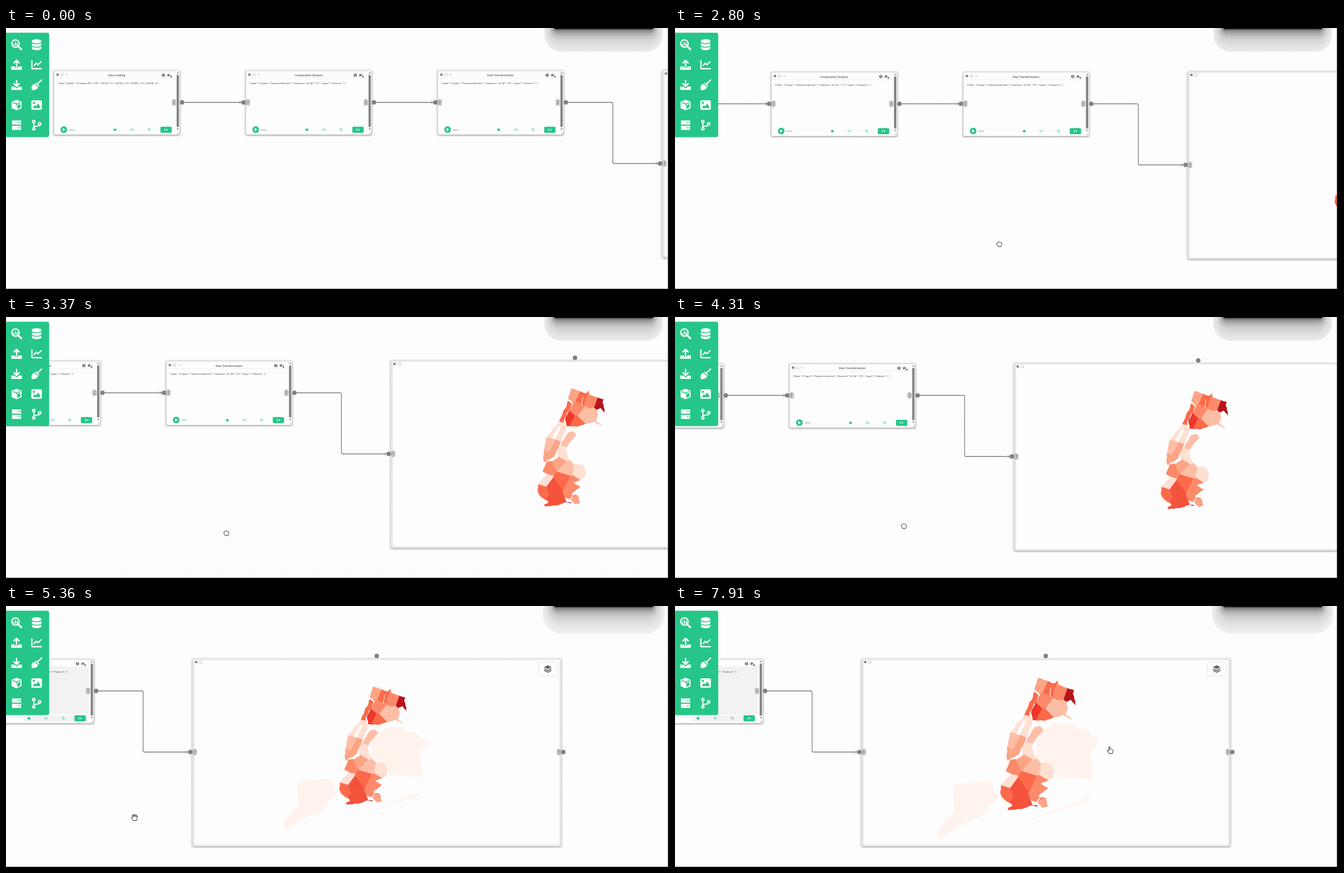
An HTML page for the animation above (8 s loop, 1192x470 px).

```html
<!DOCTYPE html>
<html lang="en">
<head>
<meta charset="utf-8">
<title>Dataflow canvas</title>
<style>
html, body { margin: 0; width: 100%; height: 100%; overflow: hidden; background: #fdfdfd; }
svg { display: block; width: 100vw; height: 100vh; }
text { font-family: "Open Sans", "Noto Sans", sans-serif; }
.title { font-size: 4.8px; font-weight: 600; fill: #555; text-anchor: middle; }
.body { font-size: 4.18px; fill: #222; }
.done { font-size: 4px; fill: #3f7d3f; }
.line { fill: none; stroke: #7c7c7c; stroke-width: 1.3; }
.thin { fill: none; stroke: #808080; stroke-width: .7; }
.green { fill: none; stroke: #26c688; stroke-width: .8; }
.card { filter: drop-shadow(0 1px 1.4px #8c8c8c); }
.button { filter: drop-shadow(0 .5px 1.2px #bbb); }
.icon { fill: none; stroke: #fff; stroke-width: 2.6; stroke-linecap: round; stroke-linejoin: round; }
.icon .f { fill: #fff; stroke: none; }
.icon .g { fill: #26c688; stroke: none; }
.cursor { fill: #fff; stroke: #222; stroke-linejoin: round; }
</style>
</head>
<body>
<svg id="stage" viewBox="0 0 1192 470" preserveAspectRatio="none"></svg>
<script>
const LOOP = 8000;
const TICK = 134;
const GREEN = '#26c688';
const GREY = '#808080';
const WHITE = '#fdfdfd';
const GAP = 11.5;
const STEP = 345; // distance between cards
const HOME = 844.5; // pan at which the map is drawn

const rect = (x, y, w, h, r, fill, more = '') =>
  `<rect x="${x}" y="${y}" width="${w}" height="${h}" rx="${r}" fill="${fill}" ${more}/>`;
const circle = (x, y, r, fill = GREY) => `<circle cx="${x}" cy="${y}" r="${r}" fill="${fill}"/>`;
const path = (d, more = '') => `<path d="${d}" ${more}/>`;
const line = (d, cls) => path(d, `class="${cls}"`);
const at = (x, y, inner, more = '') => `<g transform="translate(${x} ${y})" ${more}>${inner}</g>`;
const label = (x, y, cls, s) => `<text x="${x}" y="${y}" class="${cls}">${s}</text>`;
const lerp = (a, b, k) => a + (b - a) * k;
const clamp = (v, a, b) => Math.min(b, Math.max(a, v));
const points = s => s.split(' ').map(p => p.split(',').map(Number));

let seed = 11;
const random = () => (seed = seed * 16807 % 2147483647) / 2147483647;

// Nodes and links
const port = (x, y) => at(x, y,
  rect(-2.8, -4.6, 5.6, 9.2, 1, '#fff', 'stroke="#555" stroke-width=".8"') +
  path('M0-3.4L1.5-1.3H-1.5ZM0 3.4L1.5 1.3H-1.5ZM-.5-1.5h1v3h-1z', 'fill="#444"'));

const expand = (x, y) => at(x, y, line('M-2-.8V-2H-.8M.8-2H2V-.8M2 .8V2H.8M-.8 2H-2V.8', 'thin'));

function card(i, title, body, shade = '') {
  return at(86 + STEP * i, 0,
    rect(-.5, 76, 227.5, 116.5, 3, '#dedede', 'class="card"') +
    rect(1, 77.8, 224.5, 113.6, 2, WHITE) +
    line('M2 90.5H219', 'thin" stroke-opacity=".15') + shade +
    circle(6.7, 84, 2.3) + expand(14.8, 84) + line('M21.8 84.2h3.4', 'thin') +
    label(113, 87, 'title', title) +
    circle(197, 85, 3) + path('M197 84.5v2M197 83v.7', 'stroke="#fff" stroke-width=".8"') +
    path('M204 84.8q0-2.3 2.6-2.3t2.6 2.1-2.6 2.1l-2.4.8zM208 87.6q2.2-.2 2.2-2.5 2 .4 2 2.1l.3 1.6q-3.2.6-4.5-1.2z', `fill="${GREY}"`) +
    label(7, 101.2, 'body', body) +
    rect(220.8, 84.5, 4, 94, 1.6, GREY) +
    path('M222.8 79.4l2 2.8h-4zM222.8 183.8l2-2.8h-4z', `fill="${GREY}"`) +
    line('M222 190.6l3-3M224 190.8l1.2-1.2', 'thin') +
    circle(18, 183, 6, GREEN) + path('M16 180l5 3-5 3z', 'fill="#fff"') +
    label(28, 184.6, 'done', 'Done') +
    path('M107.5 183.5q0-2.6 2.4-2.6t2.4 2.6v1.8h-4.8z', `fill="${GREEN}"`) +
    line('M139.4 181.4l-1.7 1.7 1.7 1.7M142 181.4l1.7 1.7-1.7 1.7M141.2 181l-1 4.2', 'green') +
    line('M169.6 181.2v1.8h1.8M169.8 182.6a2 2 0 1 1 .2 1.9', 'green') +
    rect(191.6, 177.7, 20.4, 11, 2, GREEN) +
    path('M199.6 181v4.4M201.2 183.2h3.2M203 181.8l1.5 1.4-1.5 1.4', 'fill="none" stroke="#fff" stroke-width=".9"') +
    port(216, 134));
}

const link = (x1, y1, x2, y2, d) =>
  line(`M${x1} ${y1}${d}H${x2}`, 'line') +
  line(`M${x2 - 8} ${y2 - 3}l4 3-4 3`, 'thin') +
  circle(x1, y1, 4) + circle(x2, y2, 4) + port(x2 + 8, y2);

const feature = id =>
  `{"data": "{\\"type\\": \\"FeatureCollection\\", \\"features\\": [{\\"id\\": \\"${id}\\", \\"type\\": \\"Feature\\", \\"...`;
const records = '{"data": [{"data": "{\\"Unique ID\\": {\\"0\\": 179772, \\"1\\": 221956, \\"2\\": 221806, \\"3\\": 221836, \\"4...';

// Map: rough coastlines filled with the cells around district centres
function coast(corners) {
  const pts = points(corners);
  return pts.flatMap(([x, y], i) => {
    const [u, v] = pts[(i + 1) % pts.length];
    const n = Math.ceil(Math.hypot(u - x, v - y) / 5);
    return Array.from({ length: n }, (_, j) => {
      const r = j ? 1.6 : 0;
      return [lerp(x, u, j / n) + r * (random() - .5), lerp(y, v, j / n) + r * (random() - .5)];
    });
  }).map(p => p.map(c => c.toFixed(1))).join(' ');
}

// Part of a polygon that lies nearer to a than to b.
function nearer(poly, a, b) {
  const side = p => Math.hypot(p[0] - b[0], p[1] - b[1]) ** 2 - Math.hypot(p[0] - a[0], p[1] - a[1]) ** 2;
  return poly.flatMap((p, i) => {
    const q = poly[(i + 1) % poly.length];
    const s = side(p), e = side(q);
    const cut = s * e < 0 ? [[lerp(p[0], q[0], s / (s - e)), lerp(p[1], q[1], s / (s - e))]] : [];
    return s >= 0 ? [p, ...cut] : cut;
  });
}

const reds = ['#fee0d2', '#fdbea6', '#fca486', '#fc8a6a', '#fb6a4a', '#f4523b', '#ed382b', '#b81419'];
const frame = points('480,120 780,120 780,420 480,420');

// Each centre is x,y,shade.
function region(id, shape, centres) {
  const sites = points(centres);
  const cells = sites.map(a => {
    const cell = sites.filter(b => b !== a).reduce((poly, b) => nearer(poly, a, b), frame);
    return `<polygon points="${cell.join(' ')}" fill="${reds[a[2]]}" stroke="${reds[a[2]]}" stroke-width=".5"/>`;
  });
  return `<clipPath id="${id}"><polygon points="${coast(shape)}"/></clipPath>` +
    `<g clip-path="url(#${id})">${cells.join('')}</g>`;
}

const districts =
  region('north',
    '660,145 686,154 691,149 694,157 718,165 716,171 721,191 712,180 706,183 708,192 704,203 716,213 700,205 684,209 671,214 651,213 649,198 663,172 654,164',
    '664,156,2 679,163,4 694,168,3 714,175,7 671,182,3 655,200,6 669,207,4 684,192,1 698,194,1') +
  region('island',
    '655,167 661,173 646,203 651,217 639,246 629,268 611,278 609,273 612,246 616,232 637,206',
    '650,187,4 626,222,0 643,226,0 619,247,1 631,253,2 614,270,2') +
  region('south',
    '655,224 663,222 669,229 654,246 650,256 656,272 664,281 680,282 686,292 684,306 664,315 676,322 660,335 672,338 676,352 667,354 660,346 648,342 651,350 637,355 613,358 611,354 619,350 604,339 599,329 601,316 609,307 618,300 608,295 615,277 626,276 636,270 634,256 645,239',
    '653,237,1 646,264,0 638,278,2 617,288,3 651,290,1 676,294,0 612,311,0 606,330,4 627,322,5 645,309,4 662,317,3 632,347,5 664,334,3 669,347,2') +
  path('M637 213l4 3-11 21-5-2zM657 345l9-13 1 1-9 13zM680 160l1 0-2 16-1-1z', `fill="${WHITE}"`) +
  path('M649 350l9 0 2 2z', 'fill="#9e0f14"');

const pale = [
  '525,317 582,310 596,338 581,350 572,367 545,378 530,386 505,403 499,402 501,388 525,360',
  '668,229 687,217 716,219 723,227 733,226 758,247 744,266 748,308 690,304 684,286 656,272 658,245',
  '646,373 700,353 741,336 742,342 690,359'
].map(p => `<polygon points="${coast(p)}" fill="#fff3ee"/>`).join('');

const layers = path('M0-6L7-2.6 0 .8-7-2.6Z', 'fill="#666"') +
  path('M-6.5 .4L0 3.6 6.5 .4M-6.5 3.4L0 6.6 6.5 3.4', 'fill="none" stroke="#666" stroke-width="1.7"');

const mapNode = at(HOME, -19,
  rect(334.7, 94, 664, 339, 4, '#e6e6e6', 'class="card"') +
  rect(339, 97.3, 656, 332.4, 1, WHITE) +
  circle(342, 101, 2.3) + expand(350.5, 101) +
  `<g id="map"><g class="late">${pale}</g>${districts}</g>` +
  rect(958, 101.5, 32.5, 23.5, 3, WHITE, 'class="button"') + at(974, 112.7, layers) +
  circle(666.5, 90, 4) + circle(1002, 263, 4) + port(994, 263));

const shade = `<g class="late">${rect(3, 91, 214, 85, 4, '#f2f2f2')}${rect(100, 178, 116, 11, 4, '#f2f2f2')}</g>`;

const world =
  card(0, 'Data Loading', records) +
  card(1, 'Computation Analysis', feature(1)) +
  card(2, 'Data Transformation', feature(0), shade) + mapNode +
  [0, 1].map(i => link(316.5 + STEP * i, 134, 427 + STEP * i, 134, '')).join('') +
  link(1006.5, 134, 1176, 244, 'H1088.5q2.5 0 2.5 2.5V241.5q0 2.5 2.5 2.5');

// Toolbar
const icons = [
  '<circle cx="-2" cy="-2" r="6.6" stroke-width="2.4"/><path d="M3.5 3.5L8.5 8.5" stroke-width="3.2"/><path d="M-5-1v2M-2-4.5V1.5M1-2.5v4" stroke-width="1.7"/>',
  '<path class="f" d="M-8.5-6.5C-8.5-11 8.5-11 8.5-6.5V6.5C8.5 11-8.5 11-8.5 6.5Z"/><path d="M-8.5-4C-6-.8 6-.8 8.5-4M-8.5 2.2C-6 5.4 6 5.4 8.5 2.2" stroke="#26c688" stroke-width="1.5"/>',
  '<path d="M0 3V-7M-4.5-3.5L0-8 4.5-3.5"/><path class="f" d="M-9.5 3H-3V5H3V3H9.5V9H-9.5Z"/>',
  '<path d="M-8.5-7V5.5q0 1.5 1.5 1.5H8.5M-4.5 1.5L-.5-3 2.5 0 8-5.5" stroke-width="2.3"/>',
  '<path d="M0-8V2M-4.5-2L0 2.5 4.5-2"/><path class="f" d="M-9.5 3H-4L0 6.5 4 3H9.5V9H-9.5Z"/>',
  '<path d="M9-9L2-2" stroke-width="2.4"/><path class="f" d="M-1-4.5L5 1.5 3.5 3-2.5-3ZM-3.5-2L2.5 4C2 8-3 9.5-9.5 9.5L-6.5 6-9.5 7C-9 2-7.5-1.5-3.5-2Z"/>',
  '<path class="f" d="M0-9.5L9-6V5.5L0 9.5-9 5.5V-6Z"/><path d="M-7-4.5L0-2 7-4.5M0-2V0" stroke="#26c688" stroke-width="1.6"/><path class="g" d="M1.3 0L7-2V4.2L1.3 7Z"/>',
  '<rect class="f" x="-9.5" y="-8.5" width="19" height="17" rx="2.5"/><circle class="g" cx="-5" cy="-4" r="2"/><path class="g" d="M-7 5.5L-3 0-1 2.5 3-3 7.5 5.5Z"/>',
  '<path d="M-8-4.7H8M-8 4.8H8" stroke-width="7.6" stroke-linecap="square" transform="scale(.7 1)"/><path d="M3-4.7h.1M6.3-4.7h.1M3 4.8h.1M6.3 4.8h.1" stroke="#26c688" stroke-width="2"/>',
  '<g stroke-width="2"><circle cx="-5" cy="-6.5" r="2.2"/><circle cx="-5" cy="6.5" r="2.2"/><circle cx="5.5" cy="-2.5" r="2.2"/><path d="M-5-4V4M-5 2.5C-4 1 5.5 3 5.5 0"/></g>'
];
const sidebar = rect(-6, 8.6, 83.7, 187.8, 4, GREEN) +
  icons.map((d, i) => at(19 + 36 * (i % 2), 30 + 36.25 * (i >> 1), d, 'class="icon"')).join('');

// Dark panel cut by the top edge; its shadow darkens in bands from k = 0 to 1
function band(k) {
  const half = 106.5 - 16 * k;
  const tone = Math.round(233 - 34 * k - 75 * Math.max(0, k) ** 4);
  return rect(1074.5 - half, -80, 2 * half, 122.5 - 37 * k, 30 - 22 * k, `rgb(${tone},${tone},${tone})`);
}
const panel = `<g class="late">${band(-.2)}${band(-.1)}</g>` +
  Array.from({ length: 10 }, (_, i) => band(i / 9)).join('') +
  rect(985, -20, 179.5, 22.2, 4, '#111');

const cursors = {
  open: 'M-2.5 5.5L-5.5 1C-6-.5-4.5-1-3.5 .2L-3-.2-4.3-3.5C-4.3-5-2.8-5-2.3-3.8L-1.5-1.5-1.6-5C-1.3-6.3 .2-6.3 .4-5L.7-1.6 1.8-4.6C2.5-5.7 3.8-5.2 3.6-4L3-1 4.2-2.6C5.2-3.2 6-2.5 5.5-1.5L4.3 2.5 3.6 5.5Z',
  grab: 'M-4.2 .2C-4.6-2-3.6-3.2-2.3-2.9-1.8-4.5-.3-4.4 .2-3.5 1.3-4.4 2.3-3.8 2.6-2.9 4-3.3 4.7-2.2 4.6-.8 4.6 1.6 3.8 2.6 3.3 4.5H-1.8C-2.6 2.8-3.8 2-4.2 .2Z',
  point: 'M-1.5 6.5L-4.8 1.7C-5.4 .4-4 0-3 1L-2 2V-4.8C-2-6.3-.1-6.3-.1-4.8V-1.2C.8-2 1.7-1.6 1.9-.8 2.8-1.4 3.6-1 3.8-.2 4.9-.6 5.4 0 5.4 1V3.5L4.4 6.5Z'
};

const stage = document.getElementById('stage');
stage.innerHTML =
  `<defs><pattern id="dots" width="${GAP}" height="${GAP}" patternUnits="userSpaceOnUse">${circle(5, 2, .5, '#e6e6e6')}</pattern></defs>` +
  rect(0, 0, 1192, 470, 0, WHITE) + rect(0, 0, 1192, 470, 0, 'url(#dots)') +
  `<g id="world">${world}</g>` + sidebar + panel +
  rect(0, 469, 1192, 1, 0, '#9a9a9a') + rect(1190, 0, 2, 470, 0, '#161616') +
  '<path id="cursor" class="cursor"/>';

const [dots, worldEl, map, cursor] = ['dots', 'world', 'map', 'cursor'].map(id => document.getElementById(id));
const lateParts = document.querySelectorAll('.late');

// Pointer stops as tick,x,y; it moves evenly between them.
const stops = points('4,974,415 5,890,388 6,884,386.7 16,884,386.7 20,626,389.2 21,583,389.2 24,396,389.2 26,396,389.2 28,569,367 29,576,367 30,576,367 33,329,381.3 34,312,383 36,219.5,383.5 38,219.5,383.5 40,231,381 41,231,381 43,530,328 46,750,301 48,729,279 56,729,279 59,782,259');
const drags = [[16, 24], [30, 36]];

function pointerAt(n) {
  const i = clamp(stops.findIndex(s => s[0] > n), 1, stops.length - 1);
  const [a, b] = n >= stops.at(-1)[0] ? [stops.at(-1), stops.at(-1)] : [stops[i - 1], stops[i]];
  const k = a === b ? 0 : (n - a[0]) / (b[0] - a[0]);
  return [lerp(a[1], b[1], k), lerp(a[2], b[2], k)];
}

// The canvas follows each drag one tick behind the pointer.
function panAt(n) {
  return drags.reduce(([x, y], [from, to]) => {
    const a = pointerAt(from), b = pointerAt(clamp(n - 1, from, to));
    return [x + b[0] - a[0], y + b[1] - a[1]];
  }, [0, 0]);
}

function draw(t) {
  const n = Math.floor((t + 18) / TICK);
  const [px, py] = panAt(n);
  const held = drags.some(([from, to]) => n >= from && n <= to + 1);
  const wheel = (n >= 50) + (n === 51 || (n > 51 && n < 56));
  worldEl.setAttribute('transform', `translate(${px} ${py})`);
  dots.setAttribute('patternTransform', `translate(${px % GAP} ${py})`);
  map.setAttribute('transform', `translate(720 275) scale(${1.12 ** wheel}) translate(-720 -275)`);
  for (const el of lateParts) el.style.display = n >= 35 ? 'inline' : 'none';
  cursor.setAttribute('d', cursors[held ? 'grab' : n < 43 ? 'open' : 'point']);
  cursor.setAttribute('transform', `translate(${pointerAt(n)})`);
  cursor.style.display = n < 4 ? 'none' : 'inline';
}

const start = performance.now();
function tick(now) {
  draw(Math.max(0, now - start) % LOOP);
  requestAnimationFrame(tick);
}
draw(0);
requestAnimationFrame(tick);
</script>
</body>
</html>
```
